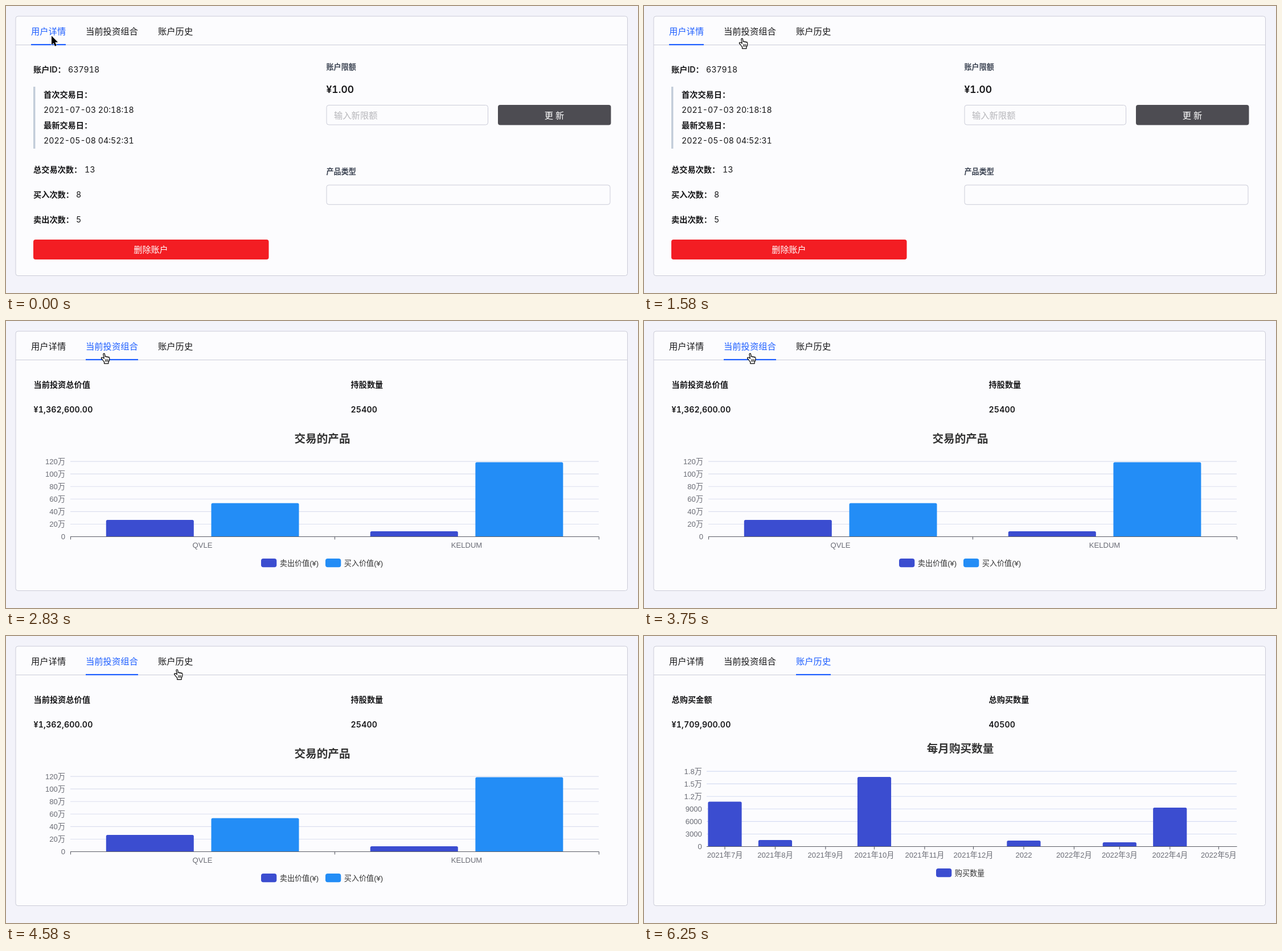
An HTML page that plays this animation: 1110 by 505 pixels, repeating every 7510 ms.

```html
<!DOCTYPE html>
<html lang="zh-CN">
<head>
<meta charset="utf-8">
<title>账户</title>
<style>
  html, body { margin: 0; width: 100%; height: 100%; overflow: hidden; background: #f3f3fa; }
  svg { display: block; width: 1110px; height: 505px; }
  text { font-family: Inter, "Noto Sans CJK SC", "Noto Sans CJK JP", sans-serif; font-feature-settings: "tnum"; white-space: pre; }
  .chart text { font-family: "Liberation Sans", "Noto Sans CJK SC", "Noto Sans CJK JP", sans-serif; }
</style>
</head>
<body>
<svg id="stage" viewBox="0 0 1110 505"></svg>
<script>
const LOOP = 7510;
const INK = [22, 22, 24], BLUE = [29, 94, 255];
const INDIGO = '#3b4dd0', SKY = '#238df6', LABEL = '#6a6c75', EDGE = '#cbccd8';
const stage = document.getElementById('stage');

function add(parent, tag, attrs, content) {
  const el = document.createElementNS('http://www.w3.org/2000/svg', tag);
  for (const k in attrs) el.setAttribute(k, attrs[k]);
  if (content !== undefined) el.textContent = content;
  parent.appendChild(el);
  return el;
}

// Text placed by its vertical middle
function label(parent, x, mid, str, size, opt = {}) {
  return add(parent, 'text', {
    x, y: mid + size * 0.365, 'font-size': size, fill: '#161618', ...opt
  }, str);
}

const box = (parent, x, y, x2, y2, fill, rx = 0, stroke = 'none') =>
  add(parent, 'rect', { x, y, width: x2 - x, height: y2 - y, fill, rx, stroke });

const line = (parent, x, y, x2, y2, stroke) =>
  add(parent, 'path', { d: `M${x} ${y}L${x2} ${y2}`, stroke, 'stroke-width': 1.1 });

const BOLD = { 'font-weight': 600 };
const group = cls => add(stage, 'g', cls ? { class: cls } : {});

// Card and tabs
box(stage, 17, 18, 1091.5, 474.5, '#fcfcfe', 4, EDGE);
line(stage, 17, 68.5, 1091.5, 68.5, EDGE);
const tabs = [[44, 61, '用户详情'], [140, 92, '当前投资组合'], [267, 61, '账户历史']];
const tabText = tabs.map(([x, , s]) => label(stage, x, 44, s, 15.3));
const bar = add(stage, 'rect', { y: 66.9, height: 2.2, fill: '#1d5eff' });

// Panel 1: account details
function buildDetails() {
  const g = group();
  const pair = (y, name, x, value) => {
    label(g, 48, y, name, 14.2, BOLD);
    label(g, x, y, value, 14.2);
  };
  pair(112, '账户ID：', 109, '637918');
  box(g, 48, 142, 51.4, 251, '#c2ccd9');
  label(g, 66, 156, '首次交易日：', 14.2, BOLD);
  label(g, 66, 183, '2021-07-03 20:18:18', 14.2);
  label(g, 66, 210, '最新交易日：', 14.2, BOLD);
  label(g, 66, 237, '2022-05-08 04:52:31', 14.2);
  pair(287.5, '总交易次数：', 138, '13');
  pair(331.5, '买入次数：', 123, '8');
  pair(375.5, '卖出次数：', 123, '5');
  box(g, 48, 411, 461.5, 446, '#f31d23', 4);
  const white = { fill: '#fff', 'text-anchor': 'middle' };
  label(g, 254.5, 428.5, '删除账户', 15.1, white);

  const head = { ...BOLD, fill: '#3c4453' };
  label(g, 562.5, 107, '账户限额', 13.1, head);
  label(g, 562.5, 147, '¥1.00', 17.5, BOLD);
  box(g, 563, 174.5, 846.5, 209, '#fcfcfe', 4, EDGE);
  label(g, 576, 192, '输入新限额', 15.3, { fill: '#b6b6ba' });
  box(g, 864, 174, 1062.5, 209.5, '#4d4c52', 4);
  label(g, 963, 192, '更 新', 15.3, white);
  label(g, 562.5, 291, '产品类型', 13.1, head);
  box(g, 563, 315, 1061, 349.3, '#fcfcfe', 4, EDGE);
  return g;
}

function summary(g, items) {
  items.forEach(([name, value], i) => {
    const x = i ? 605.5 : 48.5;
    label(g, x, 112, name, 14.2, BOLD);
    label(g, x, 156, value, 14.2, { ...BOLD, 'letter-spacing': 0.15 });
  });
}

function chartFrame(c, o) {
  label(c, 555.5, o.titleY, o.title, 19.6, { 'font-weight': 700, fill: '#333', 'text-anchor': 'middle' });
  o.scale.forEach((s, i) => {
    const y = o.base - i * 22.07;
    if (i) line(c, o.left, y, 1041, y, o.grid);
    label(c, o.scaleX, y, s, 13.1, { fill: LABEL, 'text-anchor': 'end' });
  });
}

function column(c, x, top, w, base, fill) {
  add(c, 'path', {
    d: `M${x} ${base}V${top + 2.5}q0-2.5 2.5-2.5h${w - 5}q2.5 0 2.5 2.5V${base}z`, fill
  });
}

function axis(c, left, y, ticks, names, end) {
  line(c, left, y, 1041.5, y, '#5b5d66');
  ticks.forEach(x => line(c, x, y, x, y + end, '#5b5d66'));
  names.forEach(([x, s]) =>
    label(c, x, y + 15.2, s, 13.1, { fill: LABEL, 'text-anchor': 'middle' }));
}

function legend(c, x, y, fill, s) {
  box(c, x, y, x + 27.3, y + 15.3, fill, 4);
  label(c, x + 32.8, y + 8, s, 13.1, { fill: '#333' });
}

// Panel 2: current portfolio
function buildPortfolio() {
  const g = group(), c = add(g, 'g', { class: 'chart' });
  summary(g, [['当前投资总价值', '¥1,362,600.00'], ['持股数量', '25400']]);
  chartFrame(c, {
    title: '交易的产品', titleY: 207, base: 379.5, left: 113, scaleX: 104, grid: '#dcdfee',
    scale: ['0', '20万', '40万', '60万', '80万', '100万', '120万']
  });
  [[175.8, 350, INDIGO], [360.5, 320.6, SKY], [639.8, 370, INDIGO], [824.4, 248.6, SKY]]
    .forEach(([x, top, fill]) => column(c, x, top, 154, 379.5, fill));
  axis(c, 113, 379.5, [113.5, 577.5, 1041.5], [[345, 'QVLE'], [809, 'KELDUM']], 5);
  legend(c, 448, 418, INDIGO, '卖出价值(¥)');
  legend(c, 561, 418, SKY, '买入价值(¥)');
  return g;
}

// Panel 3: account history, months spaced by their days
function buildHistory() {
  const g = group(), c = add(g, 'g', { class: 'chart' });
  summary(g, [['总购买金额', '¥1,709,900.00'], ['总购买数量', '40500']]);
  chartFrame(c, {
    title: '每月购买数量', titleY: 198, base: 370.5, left: 110, scaleX: 101.8, grid: '#d5dcf2',
    scale: ['0', '3000', '6000', '9000', '1.2万', '1.5万', '1.8万']
  });
  const tops = { 0: 291.5, 1: 359, 3: 248, 6: 360, 8: 363, 9: 302 };
  const first = Date.UTC(2021, 6, 1);
  const names = Array.from({ length: 11 }, (_, i) => {
    const d = new Date(Date.UTC(2021, 6 + i, 1));
    const y = d.getUTCFullYear(), m = d.getUTCMonth() + 1;
    return [142 + (d - first) / 864e5 * 2.853, m === 1 ? `${y}` : `${y}年${m}月`];
  });
  names.forEach(([x], i) => {
    if (tops[i]) column(c, x - 29.6, tops[i], 59.2, 370.5, INDIGO);
  });
  axis(c, 110, 370.5, names.map(n => n[0]), names, 5);
  legend(c, 513, 409, INDIGO, '购买数量');
  return g;
}

const panels = [buildDetails(), buildPortfolio(), buildHistory()];

// Pointers
const arrow = add(stage, 'path', {
  d: 'M0 0V15.6L3.5 12.3 6 18.2 8.7 17 6.2 11.2H11.1Z', transform: 'translate(80 52.6)',
  fill: '#000', stroke: '#fff', 'stroke-width': 1.2, 'paint-order': 'stroke'
});
const hand = add(stage, 'g', { stroke: '#000', 'stroke-width': 1.2, 'stroke-linejoin': 'round', 'stroke-linecap': 'round' });
add(hand, 'path', {
  fill: '#fff',
  d: 'M6 1.2C4.8 1.2 4.3 2.2 4.6 3.4L6 10 4.3 8.6C3 7.6 1.2 8 1 9 .9 9.8 2 10.6 3 12 4.2 13.8 5.2 14.8 6.2 16V18.8H13.6V16.4C15 14.6 15.6 12.6 15.5 10 15.5 8.6 15.3 7.6 14.4 7.4 13.6 7.2 13 7.6 12.9 8.4 12.8 7 12.2 6.4 11.4 6.5 10.6 6.5 10.3 7 10.2 7.6 10 6.5 9.4 6 8.6 6.2 8.2 6.2 8 6.4 7.8 6.8L7.2 2.8C7.1 1.8 6.8 1.2 6 1.2Z'
});
add(hand, 'path', { d: 'M8.4 11.6v3.8M10.5 11.6v3.8M12.6 11.6v3.8', fill: 'none', 'stroke-width': 1 });

// Hand position: [time, x, y]
const moves = [
  [420, 74, 53], [1330, 98, 54], [1413, 138, 55.5], [1497, 160, 56], [1580, 166.3, 56],
  [3750, 180.5, 56], [3830, 199, 56.6], [3920, 221, 58], [4000, 243, 60], [4080, 262, 61.2],
  [4170, 276, 61.6], [4250, 286, 61], [4330, 290.2, 60.2], [4500, 292, 59.2], [4580, 294.5, 57.8]
];
// Tab switches: steps in which the picture changes, and when the slide began
const switches = [
  { begin: 2488, steps: [2580, 2670, 2750, 2830] },
  { begin: 5510, steps: [5500, 5580, 5670, 5750, 5830] }
];

const last = (list, ok) => list.filter(ok).pop();
const mix = (a, b, p) => a + (b - a) * p;
const ease = t => t < 0.5 ? 4 * t ** 3 : 1 - 4 * (1 - t) ** 3;

function draw(t) {
  let page = 0, from = 0, k = 1;
  switches.forEach(({ begin, steps }, i) => {
    const at = last(steps, s => s <= t);
    if (at === undefined) return;
    page = i + 1;
    from = i;
    k = Math.min(1, Math.max(0, (at - begin) / 300));
  });

  panels.forEach((p, i) => p.setAttribute('display', i === page ? 'inline' : 'none'));
  const p = ease(k);
  bar.setAttribute('x', mix(tabs[from][0], tabs[page][0], p));
  bar.setAttribute('width', mix(tabs[from][1], tabs[page][1], p));
  tabText.forEach((el, i) => {
    const on = i === page ? k : i === from ? 1 - k : 0;
    el.setAttribute('fill', `rgb(${INK.map((v, j) => Math.round(mix(v, BLUE[j], on)))})`);
  });

  const pos = last(moves, m => m[0] <= t);
  arrow.setAttribute('display', pos ? 'none' : 'inline');
  hand.setAttribute('display', pos && t < 6250 ? 'inline' : 'none');
  if (pos) hand.setAttribute('transform', `translate(${pos[1]} ${pos[2]})`);
}

function tick() {
  draw(performance.now() % LOOP);
  requestAnimationFrame(tick);
}
draw(0);
requestAnimationFrame(tick);
</script>
</body>
</html>
```
